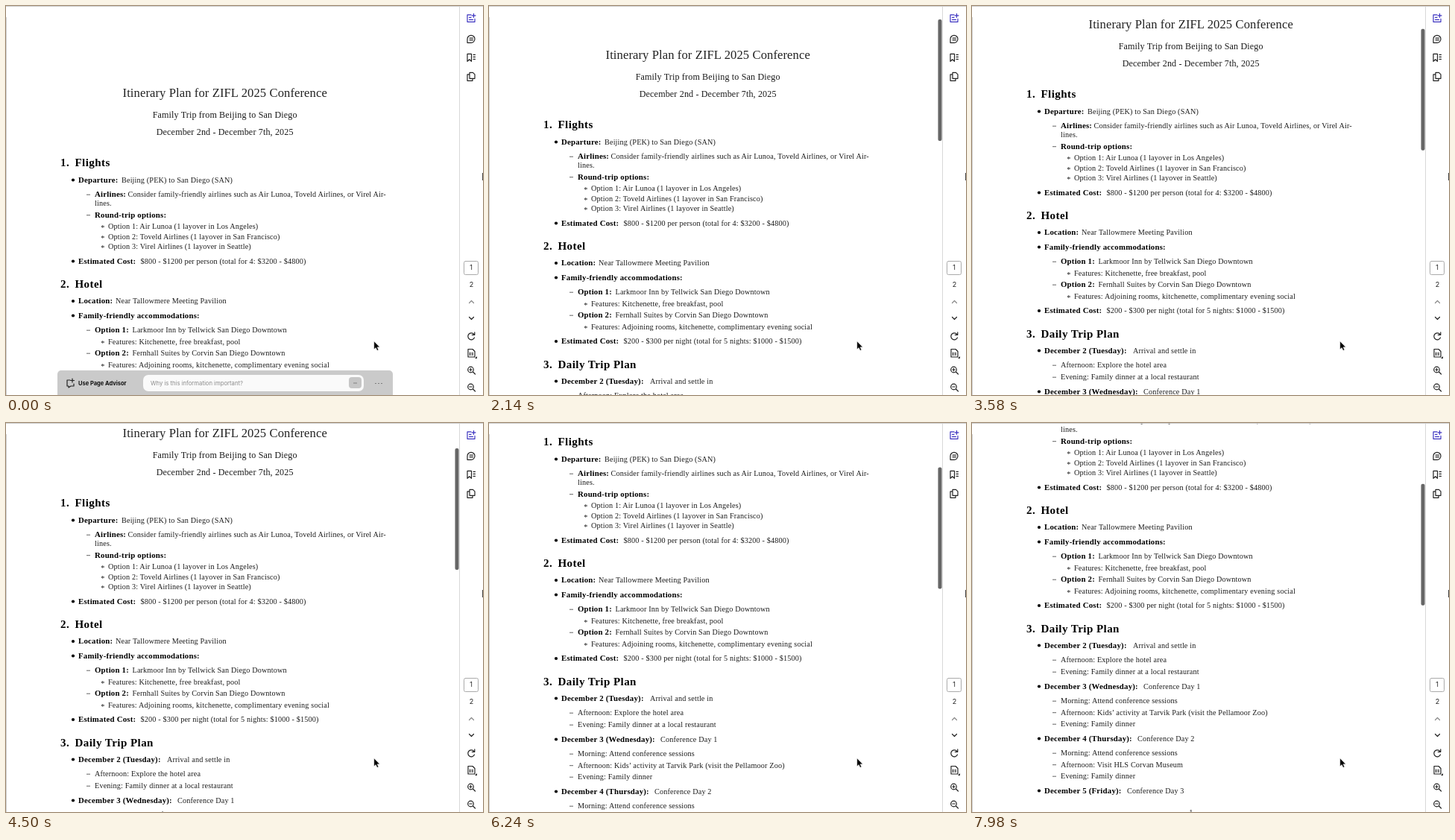
Write an HTML page that moves like this. It is 640 px wide and 522 px high and loops after 8000 ms.

```html
<!DOCTYPE html>
<html lang="en">
<head>
<meta charset="utf-8">
<title>Itinerary</title>
<style>
html, body { margin: 0; width: 100%; height: 100%; overflow: hidden; background: #fff; }
svg { display: block; }
text { white-space: pre; }
.doc text { font: 10.2px "Liberation Serif", serif; letter-spacing: .0154em; fill: #1c1c1c; }
.doc .bold { font-size: 10.8px; font-weight: 700; letter-spacing: .02em; fill: #000; }
.doc .title { font-size: 16.6px; letter-spacing: .0055em; text-anchor: middle; fill: #222; }
.doc .sub { font-size: 12.1px; letter-spacing: .0115em; text-anchor: middle; }
.doc .head { font-size: 15px; font-weight: 700; letter-spacing: .03em; fill: #000; }
.ui { font-family: Inter, "Open Sans", sans-serif; }
.icon { fill: none; stroke: #222; stroke-width: 1.2; stroke-linecap: round; stroke-linejoin: round; }
.icon .accent { stroke: #3b32c0; }
</style>
</head>
<body>
<svg width="640" height="522" viewBox="0 0 640 522">
  <rect width="640" height="522" fill="#fff"/>
  <g id="doc" class="doc"></g>

  <g id="bar" class="ui">
    <path d="M69 522V494a5 5 0 0 1 5-5H514a5 5 0 0 1 5 5V522Z" fill="#cacaca"/>
    <g class="icon">
      <path d="M86 502H82V510H84V512L87 510H91V507"/>
      <path d="M89 500V505M86.500 502.500H91.500"/>
    </g>
    <text x="97" y="509" font-size="7.500" font-weight="700" fill="#111">Use Page Advisor</text>
    <rect x="184" y="495" width="296" height="22" rx="7" fill="#fafafa"/>
    <text x="194" y="508.500" font-size="7.700" fill="#8a8a8a">Why is this information important?</text>
    <rect x="460" y="498" width="17" height="15" rx="4" fill="#c6c6c6"/>
    <path d="M466 506H471" stroke="#8c8c8c" stroke-width="1.200"/>
    <path d="M496 506.500h.01M500 506.500h.01M504 506.500h.01" class="icon" stroke-width="2"/>
  </g>

  <rect id="thumb" x="602.500" width="5" height="163" rx="2" fill="#666"/>

  <g class="ui">
    <rect x="608" y="1" width="32" height="521" fill="#fff"/>
    <path d="M608.500 1V522" stroke="#d8d8d8"/>
    <path d="M0 .5H640" stroke="#cfcfcf"/>
    <path d="M.5 15V522" stroke="#cfcfcf"/>
    <path d="M639.500 224V234" stroke="#444"/>

    <g class="icon">
      <g transform="translate(0 -.7)">
        <g class="accent">
          <path d="M624 12.500H619V22H629V18M621.500 16H624M621.500 19H626.500"/>
          <path d="M627.500 11V16M625 13.500H630"/>
        </g>
        <path d="M619 50V45A5 5 0 1 1 624 50ZM622 43.800H626.500M622 46.300H626.500"/>
        <path d="M619 65H624.500V75L621.800 72.500L619 75ZM627 66H629.500M627 69H629.500M627 72H629.500"/>
        <path d="M622 90H626.500L629 92.500V98H622ZM622 92.500H619V101H626V98"/>
      </g>
      <rect x="614.500" y="342.500" width="19" height="18" rx="2" style="stroke:#aaa;stroke-width:1"/>
      <path d="M621.500 398.500L624.500 395.500L627.500 398.500" style="stroke:#888"/>
      <path d="M621.500 417.500L624.500 420.500L627.500 417.500"/>
      <path d="M628.200 441A4.500 4.500 0 1 0 628.500 445M628.800 437.800V441.300H625.300"/>
      <path d="M620 460.500H626L629 463.500V471H620ZM622.500 465V468.500M626 465V468.500M624.300 465.800v.01M624.300 468v.01"/>
      <path d="M632 470V473H629Z" style="fill:#222;stroke:none"/>
      <circle cx="623.500" cy="488" r="3.800"/>
      <path d="M626.500 491L629.500 494M621.800 488H625.200M623.500 486.300V489.700"/>
      <circle cx="623.500" cy="511" r="3.800"/>
      <path d="M626.500 514L629.500 517M621.800 511H625.200"/>
    </g>
    <g font-size="9" fill="#222" text-anchor="middle">
      <text x="624" y="354">1</text>
      <text x="624.500" y="377">2</text>
    </g>
  </g>

  <path d="M493.800 450V460.600L496.200 458.400L498 462.200L499.700 461.400L498 457.800H501.400Z" fill="#000" stroke="#fff" stroke-width=".4"/>
</svg>
<script>
const LOOP = 8000, LINE = 10.25;
const MID = 293.7;

// Kinds: t title, s subtitle, h heading, b bullet, d dash, a asterisk, p plain continuation.
// Each row: kind, baseline, text, and for bold labels the run that follows and its x.
const rows = [
  ["t", 122, "Itinerary Plan for ZIFL 2025 Conference"],
  ["s", 150, "Family Trip from Beijing to San Diego"],
  ["s", 173, "December 2nd - December 7th, 2025"],
  ["h", 215, "1.", "Flights"],
  ["b", 236.5, "Departure:", "Beijing (PEK) to San Diego (SAN)", 155],
  ["d", 256, "Airlines:", "Consider family-friendly airlines such as Air Lunoa, Toveld Airlines, or Virel Air-", 163.5],
  ["p", 268, "lines."],
  ["d", 283.5, "Round-trip options:", "", 0],
  ["a", 299, "Option 1: Air Lunoa (1 layover in Los Angeles)"],
  ["a", 312.5, "Option 2: Toveld Airlines (1 layover in San Francisco)"],
  ["a", 326, "Option 3: Virel Airlines (1 layover in Seattle)"],
  ["b", 345.5, "Estimated Cost:", "$800 - $1200 per person (total for 4: $3200 - $4800)", 180.5],
  ["h", 378, "2.", "Hotel"],
  ["b", 399, "Location:", "Near Tallowmere Meeting Pavilion", 147],
  ["b", 418.5, "Family-friendly accommodations:", "", 0],
  ["d", 438, "Option 1:", "Larkmoor Inn by Tellwick San Diego Downtown", 169.5],
  ["a", 453.5, "Features: Kitchenette, free breakfast, pool"],
  ["d", 469, "Option 2:", "Fernhall Suites by Corvin San Diego Downtown", 169.5],
  ["a", 484.5, "Features: Adjoining rooms, kitchenette, complimentary evening social"],
  ["b", 504, "Estimated Cost:", "$200 - $300 per night (total for 5 nights: $1000 - $1500)", 180.5],
  ["h", 536.5, "3.", "Daily Trip Plan"],
  ["b", 557.5, "December 2 (Tuesday):", "Arrival and settle in", 216],
  ["d", 577, "Afternoon: Explore the hotel area"],
  ["d", 593, "Evening: Family dinner at a local restaurant"],
  ["b", 612.5, "December 3 (Wednesday):", "Conference Day 1", 230],
  ["d", 632, "Morning: Attend conference sessions"],
  ["d", 647.5, "Afternoon: Kids\u2019 activity at Tarvik Park (visit the Pellamoor Zoo)"],
  ["d", 663, "Evening: Family dinner"],
  ["b", 682.5, "December 4 (Thursday):", "Conference Day 2", 222],
  ["d", 702, "Morning: Attend conference sessions"],
  ["d", 717.5, "Afternoon: Visit HLS Corvan Museum"],
  ["d", 733, "Evening: Family dinner"],
  ["b", 752.5, "December 5 (Friday):", "Conference Day 3", 208],
  ["p", 782, "1"]
];

const indent = { t: MID, s: MID, h: 73, b: 97, d: 119, a: 137, p: 119 };
const scrollTimes = [
  20, 400, 880, 1440, 1720, 2540, 2720, 2880, 3580,
  4380, 4560, 4740, 4920, 5100, 5380, 5660, 5940, 6220,
  6480, 6720, 6980, 7220, 7480, 7720, 7960
];

const byId = id => document.getElementById(id);
const doc = byId("doc"), bar = byId("bar"), thumb = byId("thumb");

function add(tag, attrs, content = "") {
  const el = document.createElementNS("http://www.w3.org/2000/svg", tag);
  for (const key in attrs) el.setAttribute(key, attrs[key]);
  el.textContent = content;
  doc.append(el);
}

function addText(x, y, content, cls = "") {
  add("text", { x, y, class: cls }, content);
}

function addRow([kind, y, text, rest, restX]) {
  const x = text === "1" ? MID - 2.5 : indent[kind];
  const labelled = restX !== undefined;
  const cls = { t: "title", s: "sub", h: "head" }[kind] || (labelled ? "bold" : "");
  addText(x, y, text, cls);
  if (kind === "h") addText(92.5, y, rest, "head");
  else if (rest) addText(restX, y, rest);
  if (kind === "b") add("circle", { cx: 90, cy: y - 3, r: 2.1 });
  if (kind === "d") add("path", { d: `M108 ${y - 2.8}H113`, stroke: "#222", "stroke-width": .7 });
  if (kind === "a") addText(127.3, y + 2, "*");
}

function draw(t) {
  const steps = scrollTimes.filter(s => s <= t).length;
  const scroll = steps * LINE;
  doc.setAttribute("transform", `translate(0 ${-Math.round(scroll)})`);
  thumb.setAttribute("y", 2 + scroll * .311);
  thumb.setAttribute("opacity", t < 20 ? 0 : 1);
  bar.setAttribute("opacity", Math.max(0, Math.min(1, 1 - (t - 20) / 200)));
}

rows.forEach(addRow);
const start = performance.now();
function tick() {
  draw((performance.now() - start) % LOOP);
  requestAnimationFrame(tick);
}
draw(0);
requestAnimationFrame(tick);
</script>
</body>
</html>
```
